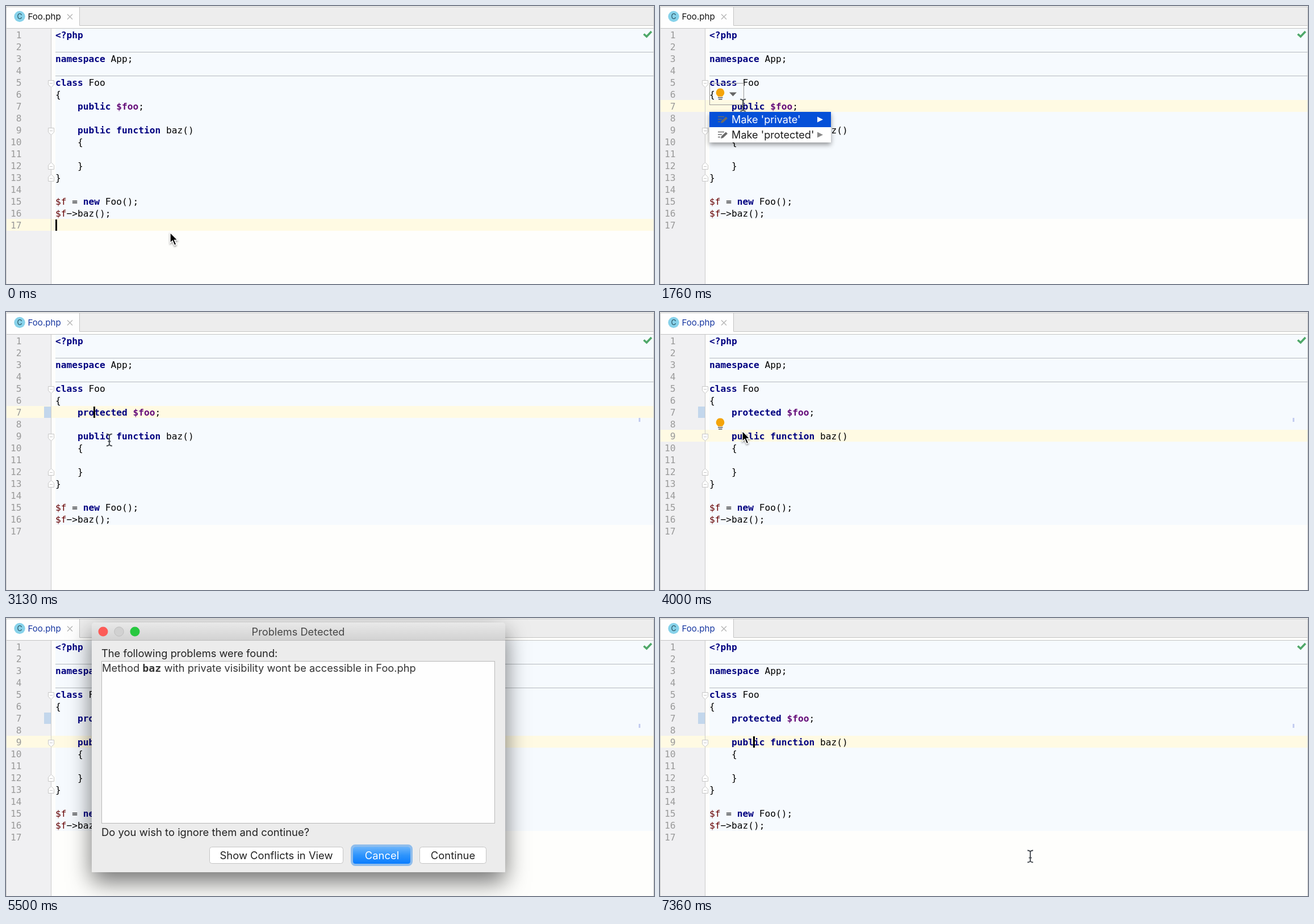
Animation of 1141 by 491 pixels, one loop 7.5 s. Source, as an HTML page:

```html
<!DOCTYPE html>
<html lang="en">
<head>
<meta charset="utf-8">
<title>Change visibility</title>
<style>
html, body { margin: 0; height: 100%; overflow: hidden; background: #fefefc; }
svg { display: block; width: 100vw; height: 100vh; font: 18.4px Inter, sans-serif; }
text { white-space: pre; }
.code { font: 16.2px "DejaVu Sans Mono", monospace; }
.kw { font-weight: bold; fill: #000080; }
.field { font-weight: bold; fill: #660e7a; }
.var { fill: #660000; }
.num { fill: #999; }
.sep { stroke: #b4b9bd; }
.fold { fill: #fff; stroke: #c6c6c6; }
.menu { font-size: 18.15px; filter: drop-shadow(0 4px 4px rgba(0,0,0,.4)); }
.item rect { fill: #fff; }
.item text { fill: #1c1c1c; }
.item .arrow { fill: #8a8a8a; }
.item.on rect { fill: #0550d8; }
.item.on text, .item.on .arrow { fill: #fff; }
.icon { fill: none; stroke: #6b6b6b; stroke-width: 1.7; }
.pencil { fill: #6b6b6b; }
.button { fill: #fff; stroke: #c4c4c4; }
#dialog { fill: #222; filter: drop-shadow(0 17px 20px rgba(0,0,0,.55)); }
</style>
</head>
<body>
<svg id="stage" viewBox="0 0 1141 491" xmlns="http://www.w3.org/2000/svg">
  <defs>
    <linearGradient id="titlebar" x2="0" y2="1"><stop stop-color="#e9e9e9"/><stop offset="1" stop-color="#d2d2d2"/></linearGradient>
    <linearGradient id="blue" x2="0" y2="1"><stop stop-color="#6cb5fb"/><stop offset=".5" stop-color="#2e94fc"/><stop offset="1" stop-color="#0a7dff"/></linearGradient>
  </defs>

  <rect width="1141" height="491" fill="#fefefc"/>
  <rect y="2" width="1141" height="32" fill="#ededed"/>
  <rect x="1" y="2" width="128" height="37" fill="#fefefe"/>
  <path d="M0 1.5H1141M129.5 2V34.5H1141M0 39.5H1141" fill="none" stroke="#c4c4c4"/>
  <circle cx="24" cy="18.5" r="9.7" fill="#87d2ea"/>
  <text x="24" y="23" font-size="12.5" text-anchor="middle" fill="#234a57">C</text>
  <text id="tab" x="38.5" y="24" font-size="15.1">Foo.php</text>
  <path d="M108 14.5l9 9m0-9l-9 9" stroke="#b5b5b5" stroke-width="1.3"/>

  <rect y="40" width="79" height="451" fill="#f0f0f2"/>
  <rect x="87" y="40" width="1054" height="336" fill="#f6fafe"/>
  <rect id="row" width="1141" height="21" fill="#fffae3"/>
  <path class="sep" d="M87 81.5H1141M87 123.5H1141"/>
  <path d="M79.5 40V491M.5 2V491M1140.5 2V491" stroke="#cbcbcb"/>
  <g id="changed">
    <rect x="67" y="167" width="12" height="20" fill="#c3d7ec"/>
    <rect x="1114" y="187" width="3" height="7" fill="#c4cdf0"/>
  </g>
  <g id="folds"></g>
  <g id="lines" class="code"></g>
  <path d="M1123 49.5l5 4.5 8.5-9" fill="none" stroke="#4fa869" stroke-width="3.6"/>
  <rect id="caret" width="3" height="20"/>

  <g id="bulb">
    <path d="M106 145.5a7.4 7.4 0 0 1 4.2 13.4V160h-8.4v-1.1A7.4 7.4 0 0 1 106 145.5z" fill="#f4a40a"/>
    <path d="M102 161.8h8.5M103 164.8h6.5" stroke="#555" stroke-width="1.4"/>
    <g id="frame">
      <rect x="87.5" y="136.5" width="60" height="38" fill="none" stroke="#999"/>
      <path d="M122 152.5h13l-6.5 7z" fill="#666"/>
    </g>
  </g>
  <g id="menus"></g>

  <g id="dialog">
    <path d="M151 449V14q0-6 6-6h716q6 0 6 6v435z" fill="#ececec"/>
    <path d="M151 39V14q0-6 6-6h716q6 0 6 6v25z" fill="url(#titlebar)"/>
    <path d="M151 39.5h728" stroke="#bcbcbc"/>
    <circle cx="171" cy="24" r="8.5" fill="#fc5b57"/>
    <circle cx="199" cy="24" r="8.2" fill="#d1d1d1" stroke="#bebebe"/>
    <circle cx="227" cy="24" r="8.5" fill="#27c840"/>
    <text x="514.5" y="31" font-size="18.2" text-anchor="middle" fill="#464646">Problems Detected</text>
    <text x="168" y="69" font-size="18.3">The following problems were found:</text>
    <rect x="168.5" y="76.5" width="692" height="286" fill="#fefefe" stroke="#b8b8b8"/>
    <text x="169" y="95" font-size="18.3" fill="#333">Method <tspan font-family="DejaVu Sans Mono, monospace" font-weight="bold">baz</tspan> with private visibility wont be accessible in Foo.php</text>
    <text x="168" y="385" font-size="18.45">Do you wish to ignore them and continue?</text>
    <g text-anchor="middle">
      <rect class="button" x="358.5" y="404.5" width="235" height="29" rx="4"/>
      <text x="476" y="426">Show Conflicts in View</text>
      <rect x="609" y="402" width="105" height="34" rx="6" fill="none" stroke="#8fbdec" stroke-width="4"/>
      <rect x="611" y="404" width="101" height="30" rx="4" fill="url(#blue)"/>
      <text x="662" y="426" fill="#fff">Cancel</text>
      <rect class="button" x="728.5" y="404.5" width="117" height="29" rx="4"/>
      <text x="787" y="426">Continue</text>
    </g>
  </g>

  <g id="pointer">
    <path id="arrow" d="M0 0V18.5l4.2-3.8 3.4 8 3.4-1.5-3.4-7.7h5.8z" stroke="#fff" stroke-width="1.5" style="filter:drop-shadow(0 2px 1.5px #0006)"/>
    <path id="beam" d="M-5-10.5q4 0 5 2.5 1-2.5 5-2.5M0-8.5V8.5M-5 10.5q4 0 5-2.5 1 2.5 5 2.5M-2.5 2.5h5" fill="none" stroke="#4a4f55" stroke-width="1.9"/>
    <path id="hand" d="M-2 1q2-3 4 0V8q2-1.5 3.2.6 2.2-1 3 .8 2.4-.6 2.8 1.8V16q-.5 3-2 6H0Q-1 18-5 14q-1.5-2.5.6-3 1.2 0 2.4 2zM2 8v4M5.2 8.6V12M8.2 9.4V12.5" fill="#fff" stroke="#222" stroke-width="1.4" style="filter:drop-shadow(0 2px 1.5px #0006)"/>
  </g>
</svg>
<script>
const $ = id => document.getElementById(id);
const show = (id, on) => $(id).style.display = on ? '' : 'none';
const rowTop = n => 40 + 21 * (n - 1);

// Editor text
const source = `<?php

namespace App;

class Foo
{
    public $foo;

    public function baz()
    {

    }
}

$f = new Foo();
$f\u2212>baz();
`.split('\n');

const paint = line => line.replace(/&/g, '&amp;').replace(/</g, '&lt;')
  .replace(/&lt;\?php|\b(namespace|class|public|protected|function|new)\b|\$foo|\$f/g, word => {
    const kind = word === '$foo' ? 'field' : word === '$f' ? 'var' : 'kw';
    return `<tspan class="${kind}">${word}</tspan>`;
  });
const codeLine = (line, i, id = 'line' + (i + 1)) =>
  `<text id="${id}" x="87" y="${rowTop(i + 1) + 17}">${paint(line)}</text>`;

$('lines').innerHTML = source.map((line, i) =>
  `<text class="num" x="27.5" y="${rowTop(i + 1) + 17}" text-anchor="end">${i + 1}</text>` + codeLine(line, i)
).join('') + codeLine('    protected $foo;', 6, 'edited');

$('folds').innerHTML = [[137, 1], [221, 1], [283, -1], [304, -1]].map(([y, dir]) =>
  `<path class="fold" transform="translate(79.5 ${y}) scale(1 ${dir})" d="M-5-5.5H5V2L0 6.5-5 2zM-2.5-.5h5"/>`
).join('');

// Popup menus
const itemHeight = 27;

function addMenu(id, y, width, labels) {
  const items = labels.map((label, i) => `
    <g class="item" transform="translate(87 ${y + i * itemHeight})">
      <rect width="${width}" height="${itemHeight}"/>
      <path class="icon" d="M15 8.5h11M15 13h7M15 17.5h4"/>
      <path class="pencil" d="M20 20l1-4 8-7.5 3 3-8 7.5z"/>
      <text x="39" y="20">${label}</text>
      <path class="arrow" d="M${width - 24} 8.5l10 5-10 5z"/>
    </g>`);
  $('menus').innerHTML += `<g id="${id}" class="menu">${items.join('')}</g>`;
}
addMenu('fieldMenu', 187, 214, ["Make 'private'", "Make 'protected'"]);
addMenu('methodMenu', 229, 334, ['Generate PHPDoc for function', "Make 'private'", "Make 'protected'"]);

function select(id, index) {
  [...$(id).children].forEach((item, i) => item.classList.toggle('on', i === index));
}

// Pointer path: time, x, y
const path = [
  [0, 289, 400], [30, 289, 400], [250, 205, 265], [460, 156, 191], [830, 156, 191],
  [1250, 108, 158], [1600, 108, 158], [1760, 146, 175], [2050, 174, 206], [2330, 186, 219],
  [2360, 186, 219], [2460, 182, 226], [3130, 182, 226], [3340, 166, 221], [3850, 166, 221],
  [4000, 145, 210], [4220, 109, 200], [4530, 109, 200], [4800, 150, 240], [5000, 172, 262],
  [6830, 636, 473], [6960, 643, 445], [7130, 652, 421], [7500, 652, 421]
];
// Pointer shape from each time on
const shapes = [
  [0, 'arrow'], [60, 'beam'], [1000, 'arrow'], [1640, 'beam'], [1850, 'hand'], [2600, 'beam'],
  [3960, 'arrow'], [4720, 'hand'], [5400, ''], [6830, 'arrow'], [7300, 'beam']
];

function pointerAt(t) {
  const i = path.findIndex(key => key[0] > t);
  const [t0, x0, y0] = path[i - 1], [t1, x1, y1] = path[i];
  const k = t0 === 5000 ? 0 : (t - t0) / (t1 - t0); // rests, then jumps
  return [x0 + (x1 - x0) * k, y0 + (y1 - y0) * k];
}

function draw(t) {
  const within = (a, b) => t >= a && t < b;
  const [x, y] = pointerAt(t);
  const shape = shapes.findLast(s => s[0] <= t)[1];
  $('pointer').setAttribute('transform', `translate(${x} ${y})`);
  for (const id of ['arrow', 'beam', 'hand']) show(id, id === shape);

  const row = t < 600 ? 17 : t < 3400 ? 7 : 9;
  $('row').setAttribute('y', rowTop(row));
  $('caret').setAttribute('x', { 17: 87, 7: 154, 9: 164 }[row]);
  $('caret').setAttribute('y', rowTop(row) + 1);
  show('caret', within(0, 230) || within(600, 1100) || within(2630, 3900) || t >= 7300);

  show('line7', t < 2630);
  show('edited', t >= 2630);
  show('changed', t >= 2700);
  $('tab').setAttribute('fill', t < 2700 ? '#111' : '#1535a0');

  const method = t > 3000;
  show('bulb', within(830, 2600) || within(3760, 5400));
  show('frame', within(1230, 2600) || within(4170, 5400));
  $('bulb').setAttribute('transform', `translate(0 ${method ? 42 : 0})`);

  show('fieldMenu', within(1530, 2600));
  select('fieldMenu', y > 187 + itemHeight ? 1 : 0);
  show('methodMenu', within(4400, 5400));
  select('methodMenu', y > 229 + itemHeight ? 1 : 0);

  show('dialog', within(5430, 7300));
}

function tick() {
  draw(performance.now() % 7500);
  requestAnimationFrame(tick);
}
tick();
</script>
</body>
</html>
```
